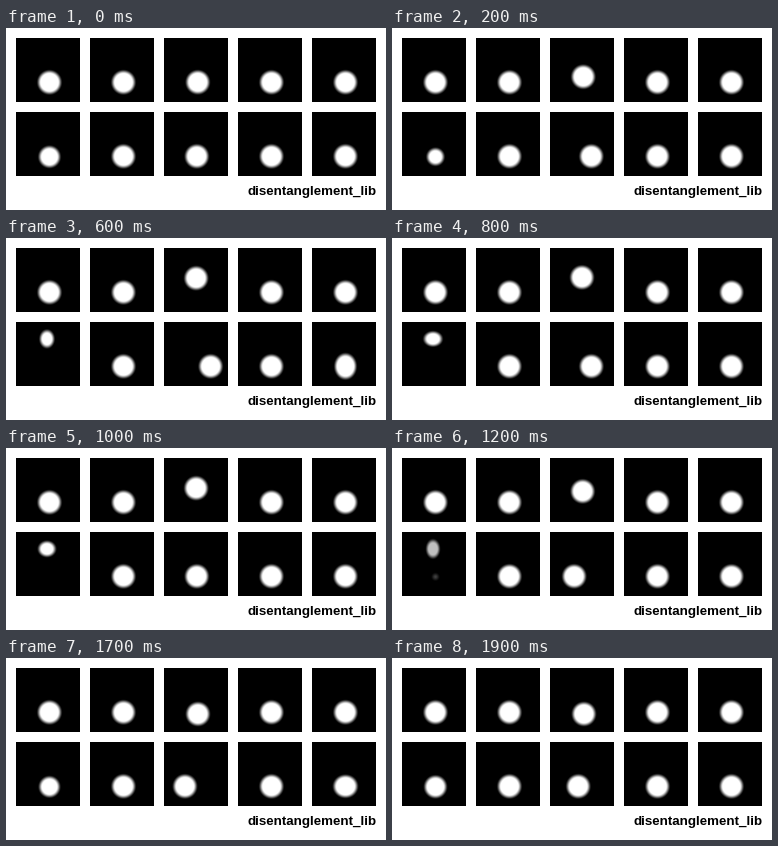
A matplotlib script for the animation above (2000 ms loop, 380 by 182 pixels).

```python
import numpy as np
import matplotlib.pyplot as plt
from matplotlib.animation import FuncAnimation

W, H, DPI = 380, 182, 100
FRAMES, STEP = 20, 100
LOOP = FRAMES * STEP
TILE, PITCH, MARGIN = 64, 74, 10
CX, CY, R = 33.5, 44.3, 10.8
EDGE = 5

ty, tx = np.mgrid[0:TILE, 0:TILE] + 0.5


def blob(cx=CX, cy=CY, rx=R, ry=None):
    """Soft-edged white ellipse on black, values 0..1."""
    ry = rx if ry is None else ry
    dist = np.hypot((tx - cx) / rx, (ty - cy) / ry)
    u = np.clip((1 - dist) * (rx + ry) / 2 / EDGE + 0.5, 0, 1)
    return u * u * (3 - 2 * u)


def phase(ms, peak):
    """Triangle wave: 0 at the peak time, 1 half a loop away."""
    d = abs(ms - peak) % LOOP
    return min(d, LOOP - d) * 2 / LOOP


def still(ms):
    return blob()


def rise(ms):
    u = phase(ms, 800)
    return blob(33 - np.cos(np.pi * u), 38 - 8.6 * np.cos(np.pi * u ** 1.25))


def slide(ms):
    return blob(32.8 + 14.6 * np.cos(np.pi * phase(ms, 500)))


def squash(ms):
    c = np.cos(np.pi * phase(ms, 500)) ** 5
    return blob(rx=R - c, ry=R + 1.3 * c)


def shrink(ms):
    """The ball shrinks away while a small ellipse takes over higher up."""
    u = phase(ms, 875)
    fade = np.clip((u - 0.3) / 0.1, 0, 1)
    low = blob(CX, CY + 0.5, 10.2 * np.sin(np.pi / 2 * u) ** 2 + 0.01)
    high = blob(31, 16.9, 8.9 - 9 * u, 6.2 + 6 * u)
    return np.maximum(low * fade, high * (1 - fade))


ROWS = [[still, still, rise, still, still],
        [shrink, still, slide, still, squash]]


def stage(ms):
    img = np.ones((H, W))
    for row, cells in enumerate(ROWS):
        for col, cell in enumerate(cells):
            x, y = MARGIN + col * PITCH, MARGIN + row * PITCH
            img[y:y + TILE, x:x + TILE] = cell(ms)
    return img


fig = plt.figure(figsize=(W / DPI, H / DPI), dpi=DPI, facecolor="white")
ax = fig.add_axes([0, 0, 1, 1])
ax.axis("off")
view = ax.imshow(stage(0), cmap="gray", vmin=0, vmax=1, aspect="auto",
                 extent=(0, W, H, 0), interpolation="nearest")
ax.text(370.5, 167.5, "disentanglement_lib", ha="right", va="baseline",
        family="Liberation Sans", weight="bold", color="black",
        fontsize=13.4 * 72 / DPI)


def update(i):
    view.set_data(stage(i * STEP))
    return [view]


anim = FuncAnimation(fig, update, frames=FRAMES, interval=STEP,
                     repeat=True, repeat_delay=0)
plt.show()
```
